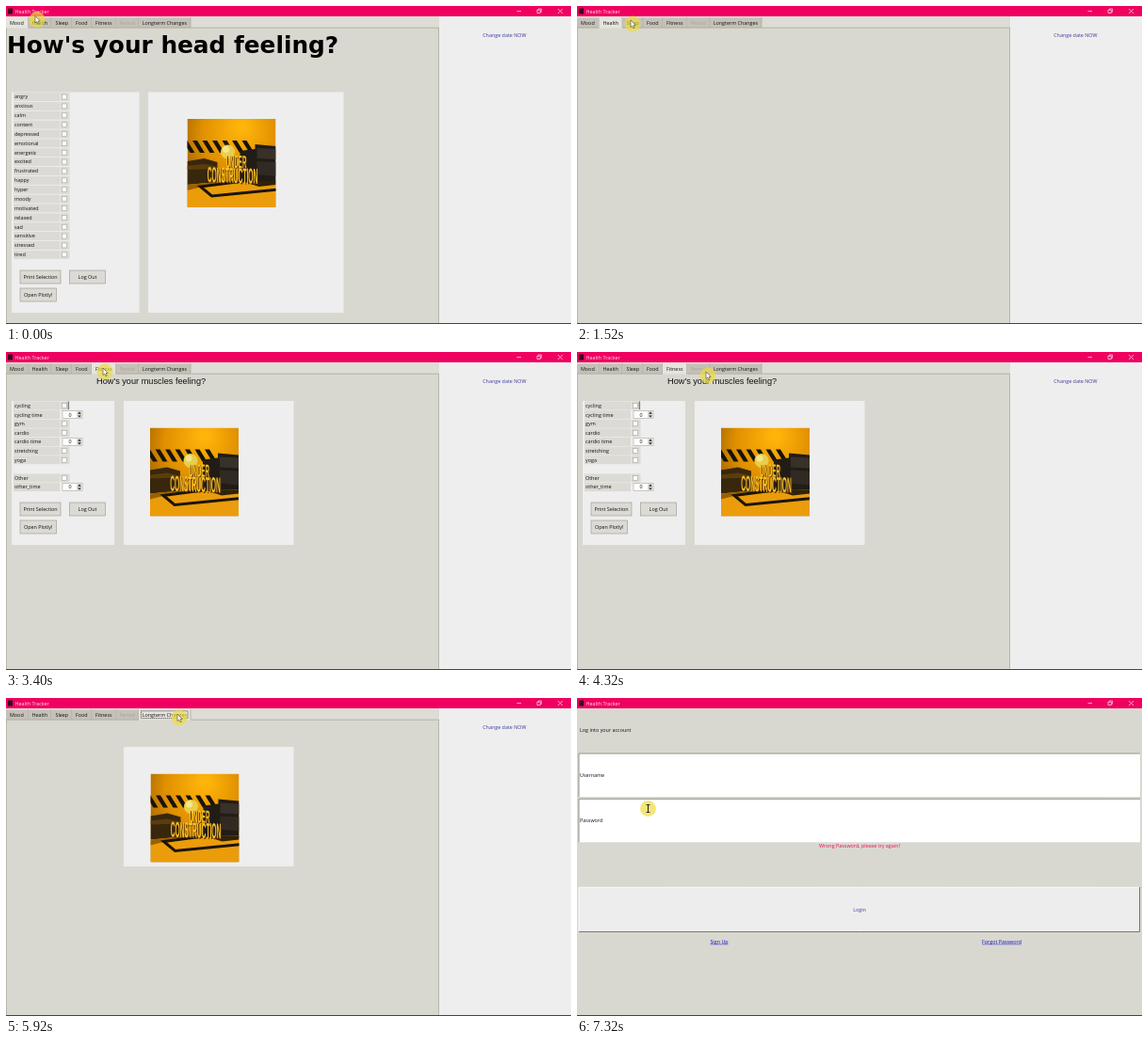
An HTML page with a canvas that plays this animation: 600 by 338 pixels, repeating every 7.4 s.

```html
<!DOCTYPE html>
<html lang="en">
<head>
<meta charset="utf-8">
<title>Health Tracker</title>
<style>
html, body { margin: 0; width: 100%; height: 100%; overflow: hidden; background: #d9d8d0; }
canvas { display: block; }
</style>
</head>
<body>
<canvas id="stage" width="600" height="338"></canvas>
<script>
const LOOP = 7400;
const c = document.getElementById('stage').getContext('2d');
const UI = '5.4px "Open Sans", "Noto Sans", sans-serif';
const BG = '#d9d8d0', PANEL = '#efeeee', CELL = '#dcdad5', INK = '#111';

function rect(x, y, w, h, fill, stroke) {
  c.fillStyle = fill;
  c.fillRect(x, y, w, h);
  if (stroke) {
    c.strokeStyle = stroke;
    c.lineWidth = .6;
    c.strokeRect(x, y, w, h);
  }
}

function text(s, x, y, color = INK, align = 'left', font = UI) {
  c.font = font;
  c.textAlign = align;
  c.textBaseline = 'alphabetic';
  c.fillStyle = color;
  c.fillText(s, x, y);
}

// Text centred vertically on y
const label = (s, x, y, color, align) => text(s, x, y + 1.9, color, align);

function poly(points, fill) {
  c.beginPath();
  for (let i = 0; i < points.length; i += 2) c.lineTo(points[i], points[i + 1]);
  c.closePath();
  c.fillStyle = fill;
  c.fill();
}

function line(color, width, ...p) {
  c.beginPath();
  c.moveTo(p[0], p[1]);
  for (let i = 2; i < p.length; i += 2) c.lineTo(p[i], p[i + 1]);
  c.strokeStyle = color;
  c.lineWidth = width;
  c.stroke();
}

function disc(x, y, r, fill) {
  c.beginPath();
  c.arc(x, y, r, 0, 7);
  c.fillStyle = fill;
  c.fill();
}

function button(s, x, y, w) {
  rect(x, y, w, 14, CELL, '#98958b');
  label(s, x + w / 2, y + 7, INK, 'center');
}

function lettering(s, x, y, size, squeeze) {
  c.save();
  c.translate(x, y);
  c.transform(squeeze, .01, 0, 1, 0, 0);
  const font = `bold ${size}px "Liberation Sans", sans-serif`;
  text(s, 3, 1, '#5a3300', 'center', font);
  text(s, 0, 0, '#f5c02c', 'center', font);
  c.restore();
}

function picture(x, y) {
  c.save();
  c.translate(x, y);
  c.beginPath();
  c.rect(0, 0, 94, 94);
  c.clip();
  const glow = c.createRadialGradient(58, 8, 4, 52, 22, 75);
  glow.addColorStop(0, '#ffb40a');
  glow.addColorStop(.5, '#e09000');
  glow.addColorStop(1, '#8a5200');
  rect(0, 0, 94, 94, glow);
  for (let i = 0; i < 7; i++) {
    const sx = i * 10.5 - 5;
    poly([sx, 23, sx + 5, 23, sx + 13, 36, sx + 8, 36], '#17130b');
  }
  poly([0, 45, 18, 42, 32, 46, 32, 68, 0, 70], '#38270d');
  poly([0, 50, 18, 48, 32, 51, 32, 53, 0, 54], '#5b3d0c');
  poly([56, 34, 72, 32, 72, 27, 94, 29, 94, 68, 56, 66], '#211c15');
  poly([74, 31, 94, 32, 94, 43, 74, 42], '#37312a');
  poly([74, 45, 94, 46, 94, 61, 74, 59], '#302a23');
  poly([0, 70, 32, 67, 94, 66, 94, 94, 0, 94], '#eb9c0a');
  poly([0, 70, 32, 67, 60, 66, 16, 72, 0, 76], '#9a6003');
  line('#1b1408', 3, 96, 75, 26, 82, 14, 72, 60, 66);
  poly([58, 66, 94, 66, 94, 70, 76, 72], '#302208');
  disc(43, 35, 7.5, '#e8ce4c');
  disc(41, 32.5, 3.5, '#f5e68c');
  lettering('UNDER', 52, 52, 19, .32);
  lettering('CONSTRUCTION', 48, 68, 23, .29);
  c.restore();
}

function spinner(y) {
  rect(60, y - 4, 21, 8, '#fff', '#aaa69c');
  label('0', 68, y, INK, 'center');
  rect(75, y - 3.7, 5.7, 7.4, CELL);
  poly([76.2, y - .8, 79.8, y - .8, 78, y - 3], '#222');
  poly([76.2, y + .8, 79.8, y + .8, 78, y + 3], '#222');
}

// "#" marks a row with a number field, an empty name leaves a gap
function rows(list, top, step) {
  list.forEach((item, i) => {
    if (!item) return;
    const y = top + i * step, spin = item.endsWith('#');
    rect(8, y - 4.5, 49, 9, CELL);
    label(item.replace('#', ''), 9, y);
    if (spin) return spinner(y);
    rect(57.5, y - 4.5, 10, 9, CELL);
    rect(59.5, y - 2.4, 4.9, 4.9, '#fff', '#aaa69c');
  });
}

function page(list, { top = 52, bottom, split = 115, left = 125, right = 305.5, step = 9.62, pic = [153, 80.5] }) {
  if (list) {
    rect(6, top, split - 6, bottom - top, PANEL);
    rows(list, top + 5, step);
    button('Print Selection', 15, bottom - 45, 43);
    button('Log Out', 67.5, bottom - 45, 38);
    button('Open Plotly!', 15, bottom - 26, 38.5);
  }
  rect(left, top, right - left, bottom - top, PANEL);
  picture(...pic);
}

const heading = s => text(s, 96, 33.5, INK, 'left', '9.2px "Liberation Sans", Arial, sans-serif');
const words = s => s.split(' ');
const MOODS = words('angry anxious calm content depressed emotional energetic excited frustrated happy hyper moody motivated relaxed sad sensitive stressed tired');
const HEALTH = words('headache migraine nausea fever cough cold cramps bloating dizzy fatigue acne allergy backache neckache toothache earache rash sore itchy injury medicine other');
const FOOD = words('breakfast lunch dinner snacks fruit vegetables meat fish dairy sweets coffee tea water other');
const FITNESS = ['cycling', 'cycling time#', 'gym', 'cardio', 'cardio time#', 'stretching', 'yoga', '', 'Other', 'other_time#'];

const views = {
  blank() {},
  mood() {
    text("How's your head feeling?", 1, 50, '#000', 'left', 'bold 24.8px "DejaVu Sans", Verdana, sans-serif');
    page(MOODS, { top: 91.5, bottom: 326, split: 141.5, left: 151, right: 358.5, step: 9.87, pic: [192.5, 120] });
  },
  health() {
    heading("How's your body feeling?");
    page(HEALTH, { bottom: 321 });
  },
  food() {
    heading('What have you eaten?');
    page(FOOD, { bottom: 241 });
  },
  fitness() {
    heading("How's your muscles feeling?");
    page(FITNESS, { bottom: 205 });
    line('#333', .7, 66.3, 52.5, 66.3, 61);
  },
  longterm() {
    page(null, { bottom: 179, pic: [153.5, 80.5] });
  }
};

// Tab name, left edge, text start
const TABS = [['Mood', 0, 4], ['Health', 23.5, 27.5], ['Sleep', 48, 52.5], ['Food', 70, 74],
  ['Fitness', 91, 95], ['Period', 116.5, 120.5], ['Longterm Changes', 141, 144.7]];

function notebook(active, view) {
  rect(0, 23, 460, 315, BG);
  rect(0, 11, 460, 12, '#dddcd5');
  TABS.forEach(([name, x, tx], i) => {
    const end = i < 6 ? TABS[i + 1][1] : 196, on = i === active;
    rect(x, on ? 11.5 : 12.5, end - x, on ? 12 : 10.5, on ? '#e6e4de' : '#c4c2b8');
    line('#a19e92', .6, end, 12, end, 23);
    label(name, tx, 18, i === 5 ? '#aaa197' : INK);
  });
  line('#a5a296', .7, 0, 23.2, TABS[active][1], 23.2);
  line('#a5a296', .7, active < 6 ? TABS[active + 1][1] : 196, 23.2, 460, 23.2);
  line('#a5a296', .7, .4, 23, .4, 337);
  line('#a5a296', .8, 459.7, 23, 459.7, 337);
  if (active === 6) {
    c.setLineDash([1.2, .8]);
    c.lineWidth = .7;
    c.strokeStyle = '#222';
    c.strokeRect(143.5, 13.8, 49.5, 7.8);
    c.setLineDash([]);
  }
  views[view]();
  rect(460, 11, 140, 327, PANEL);
  label('Change date NOW', 529.3, 31.5, '#3b3b96', 'center');
}

function field(name, y) {
  rect(2, y, 596, 46, '#fff');
  line('#8c8a82', .9, 2, y + 46, 2, y, 598, y);
  label(name, 3, y + 23);
}

function link(s, x) {
  label(s, x, 259, '#1010c8', 'center');
  const w = c.measureText(s).width / 2;
  line('#1010c8', .5, x - w, 261.8, x + w, 261.8);
}

function login() {
  rect(0, 11, 600, 327, BG);
  label('Log into your account', 3, 34);
  field('Username', 59);
  field('Password', 107.3);
  label('Wrong Password, please try again!', 300, 157.5, '#f20a50', 'center');
  rect(2, 201, 595.5, 47.5, '#eeeded');
  line('#fff', .8, 2, 248, 2, 201.3, 597, 201.3);
  line('#77756e', 1, 2, 248.5, 597.5, 248.5, 597.5, 201);
  label('Login', 300, 225, '#3b3bb0', 'center');
  link('Sign Up', 151);
  link('Forgot Password', 451);
}

function titleBar() {
  rect(0, 0, 600, 11, '#f0005f');
  rect(2, 2.5, 5, 6, '#3a0a1e');
  label('Health Tracker', 9.5, 5.8, '#ffe6ee');
  const w = '#ffe6ee';
  line(w, .7, 542.5, 5.5, 547, 5.5);
  line(w, .7, 564, 4.3, 567.3, 4.3, 567.3, 7.5, 564, 7.5, 564, 4);
  line(w, .7, 565.3, 4, 565.3, 3, 568.6, 3, 568.6, 6.3, 567.5, 6.3);
  line(w, .7, 586, 3, 591, 8);
  line(w, .7, 591, 3, 586, 8);
  rect(0, 337, 600, 1, '#444');
}

// Start time, selected tab, page content
const SCENES = [[0, 0, 'mood'], [280, 0, 'blank'], [520, 1, 'health'], [1440, 1, 'blank'], [1640, 2, 'blank'],
  [2640, 3, 'food'], [3120, 3, 'blank'], [3360, 4, 'fitness'], [5680, 4, 'blank'], [5760, 6, 'longterm'], [7280, 0, null]];

// Time, x, y of the pointer
const PATH = [[0, 33, 14.5], [400, 32, 18], [880, 33, 19], [1440, 59, 19], [1760, 59, 19], [2400, 88, 23], [2640, 88, 23],
  [3120, 105, 21], [3440, 105, 21], [4240, 139, 25], [4720, 139, 24], [5520, 184, 21], [6400, 184, 21],
  [6880, 86, 157], [7240, 75.5, 117.5], [LOOP, 75.5, 117.5]];

function pointer(t) {
  const i = PATH.findIndex(p => p[0] > t);
  const [t0, x0, y0] = PATH[i - 1], [t1, x1, y1] = PATH[i];
  const u = (t - t0) / (t1 - t0), k = u * u * (3 - 2 * u);
  c.save();
  c.translate(x0 + (x1 - x0) * k, y0 + (y1 - y0) * k);
  disc(0, 0, 8.5, 'rgba(238, 220, 60, .68)');
  if (t >= 7280) {
    line('#222', .9, -2, -4, 2, -4);
    line('#222', .9, -2, 4, 2, 4);
    line('#222', 1, 0, -4, 0, 4);
  } else {
    const arrow = [-2, -4, -2, 3.5, -.3, 2, 1, 4.8, 2.2, 4.2, 1, 1.5, 3.2, 1.4];
    poly(arrow, '#fff');
    line('#333', .55, ...arrow, -2, -4);
  }
  c.restore();
}

function draw(now) {
  const t = now % LOOP;
  const [, tab, view] = SCENES.findLast(s => s[0] <= t);
  view ? notebook(tab, view) : login();
  titleBar();
  pointer(t);
  requestAnimationFrame(draw);
}
requestAnimationFrame(draw);
</script>
</body>
</html>
```
